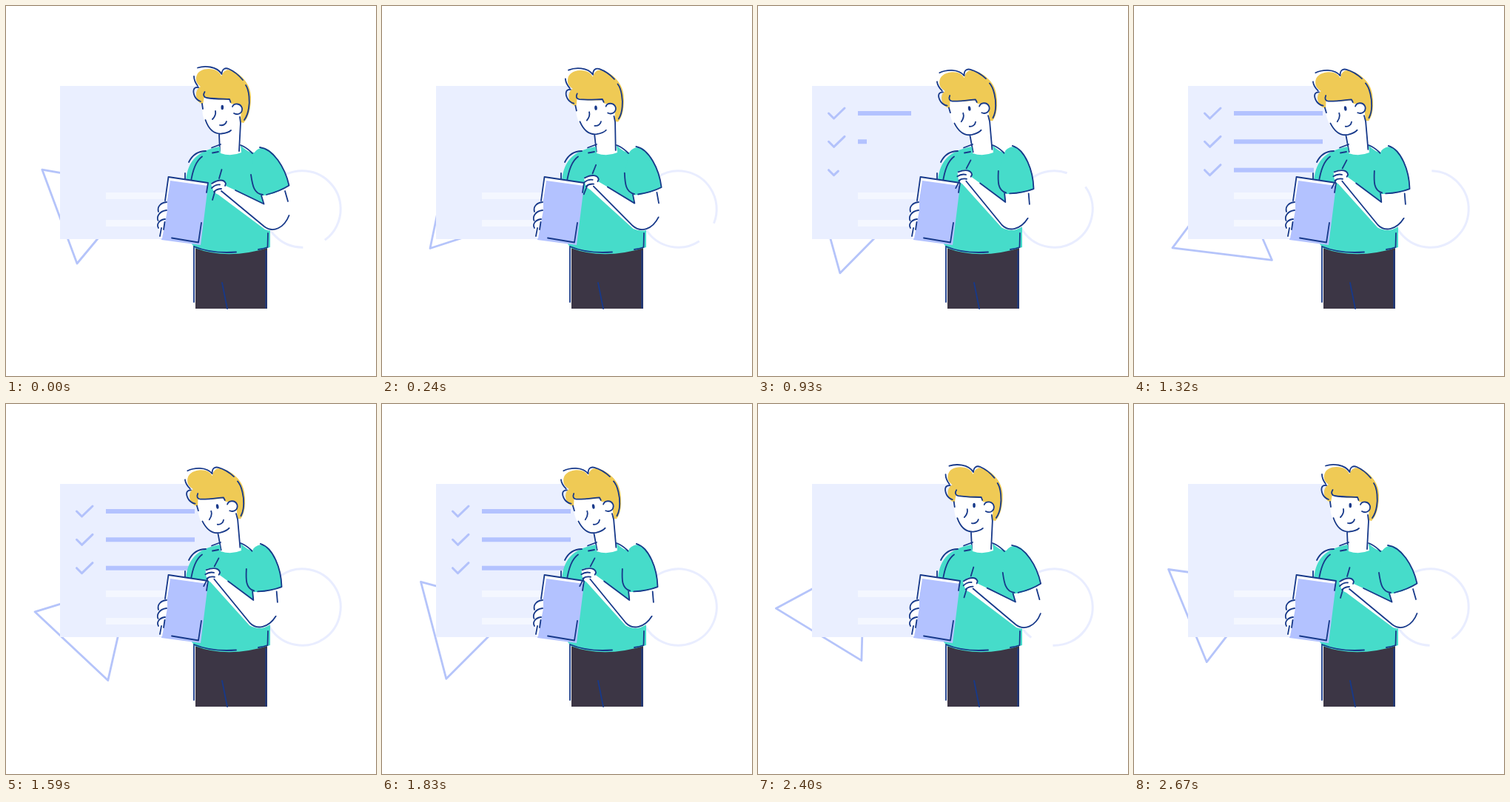
These frames come from a looping animation (500 px wide and 500 px high, 2.7 s). An HTML page:

```html
<!DOCTYPE html>
<html lang="en">
<head>
<meta charset="utf-8">
<title>Checklist</title>
<style>
  html, body { margin: 0; width: 100%; height: 100%; overflow: hidden; background: #fff; }
  svg { display: block; width: 100%; height: 100%; }
  .ink { fill: none; stroke: #17398a; stroke-width: 1.8; stroke-linecap: round; stroke-linejoin: round; }
  .teal { fill: #46dcca; }
  .skin { fill: #fff; }
  .tick { fill: none; stroke: #b3c2fb; stroke-width: 3; stroke-linecap: round; stroke-linejoin: round; }
</style>
</head>
<body>
<svg viewBox="0 0 500 500">
  <circle id="ring" cx="400.5" cy="274.5" r="51.7" fill="none" stroke="#e9edff" stroke-width="3"
    pathLength="360" stroke-dasharray="325 35"/>
  <path id="tri" d="M-67.2-62.9L-20 64L66.2-39.5Z" fill="none" stroke="#b5c4fa" stroke-width="2.8" stroke-linejoin="round"/>

  <path d="M73 108H289V315H73Z" fill="#eaefff"/>
  <path d="M135 252H255V261H135ZM135 289H255V298H135Z" fill="#f4f7ff"/>
  <g id="rows"></g>

  <!-- trousers -->
  <path d="M256 322H353V409H256Z" fill="#3c3645"/>
  <path class="ink" d="M254 325V400M351.5 331V408M292 374L299 409"/>

  <g id="head">
    <path class="skin" d="M287 160L289 199H316L317 150Z"/>
    <path class="skin" d="M265 120L265 135C265 157 274 173 290 173C303 173 313 165 316 152L318 120Z"/>
    <path fill="#efca55" d="M257 97C258 88 266 85 274 85C283 85 289 89 291 95C294 87 299 85 305 87C318 92 331 106 331 123C331 138 328 151 321 158L317 157L318 134L304 132L302 127C288 127 276 126 268 122L266 133C260 131 256 126 257 117C258 113 260 110 263 109C259 106 256 102 257 97Z"/>
    <circle class="skin" cx="312" cy="139.5" r="7"/>
    <path class="ink" d="M259 83.500C268 80.500 285 81 291.500 92C292 85 296 83 301 85C308 88 315 94 320 100M254 95C254 100 256 104 259 108M260 110C253 109 252 115 255 122C257 126 260 128 263 129M268.500 116C266 120 267 123 271 124C283 126 294 125.500 302 126L303.500 130M324 107C329 114 329.500 130 328 138C327 145 325 150 322 154"/>
    <path class="ink" d="M306 136C308 131 317 131 319 138C320 145 313 148 308 145M265 132L266 139M269.500 154C274 167 281 173 291 172.500C296 172 301 171 304 168M283 142C284 147 282 150 279 153M289 161C293 162 297 160 298 156M316 150L317 158L315 196M288 173L289 196"/>
    <ellipse cx="292.300" cy="137" rx="1.800" ry="3.200" fill="#17398a"/>
  </g>

  <!-- shirt -->
  <path class="teal" d="M243 240C244 212 256 196 289 190L290 199Q304 204 318 198L317 188Q327 200 341 198L347 262L357 300V326Q300 344 255 327L250 320Z"/>
  <path class="ink" d="M242 226V236M247 211C252 201 260 196 270 196M249.500 240C252 222 257 209 265 203.500M278 191.500L290 187M279 198.500L287 197M254 325Q278 335 311 332.500M341 329Q348 328 353.500 326L354 307M317 188Q325 191 333 199"/>

  <!-- tablet -->
  <path d="M219 231L273 239L271 250L221 245L214 275Z" fill="#fff"/>
  <path d="M222 236L273 243L263 323L210 316Z" fill="#b3c2ff"/>
  <path class="skin" d="M218 264C210 264 205 269 206 277C203 283 204 291 206 296L208 313L211 314L218 276Z"/>
  <path class="ink" d="M215 263L219.500 231L273 239L271 252M264 293L260 319.500L224 313.500M217 265C209 266 204 271 206 278M217 276C208 277 203 284 205.500 290M215 288C207 289 203 295 206 300M210 300L208 311M214.500 292L213 302"/>

  <g id="arm">
    <path class="skin" d="M277 240C283 235 292 233 297 239L297 243L310 249L349 268L344 250L378 248L383 272V285C378 299 366 307 350 302L287 255L281 252Z"/>
    <path class="teal" d="M335 199C341 190 350 190 357 196C369 206 379 224 382.500 243Q364 255 343 257L331 228Z"/>
    <path class="ink" d="M343 191C361 193 377 218 382.500 242.500Q370 250.500 352 255M331 228C333 242 335 254 347 255"/>
    <path class="ink" d="M377 250L381 264M382.500 283C376 300 361 307 349 298L291 250M310 249L348.500 267.500L345 256"/>
    <path class="ink" d="M278 240C287 234 295 234 297 240L296 243M278 246Q283 241 289 241.500M281 251Q285 247 291 247M291.500 221L288 233M282.500 250L279 262"/>
  </g>
</svg>
<script>
  const LOOP = 2700, STEP = 30, TURN = 2685;
  const $ = id => document.getElementById(id);
  const clamp = v => Math.min(1, Math.max(0, v));
  const ramp = (t, start, len) => clamp((t - start) / len);
  const ease = p => (1 - Math.cos(Math.PI * p)) / 2;

  function make(tag, attrs) {
    const el = document.createElementNS("http://www.w3.org/2000/svg", tag);
    for (const k in attrs) el.setAttribute(k, attrs[k]);
    return $("rows").appendChild(el);
  }

  const rows = [145, 183.3, 221.7].map((y, i) => ({
    start: 450 + 150 * i,
    tick: make("path", { class: "tick", d: `M95.5 ${y}l7 7l14.500-14`, pathLength: 1 }),
    bar: make("rect", { x: 135, y: y - 3, width: 0, height: 6, fill: "#b3c2ff" })
  }));

  function draw(t) {
    const turn = 360 * t / TURN;
    $("tri").setAttribute("transform", `translate(116 284) rotate(${turn})`);
    $("ring").setAttribute("transform", `rotate(${89 - turn} 400.5 274.5)`);

    const lean = ease(ramp(t, 0, 480)) - ease(ramp(t, 1980, 480));
    $("head").setAttribute("transform", `rotate(${-8 * lean} 300 185)`);
    $("arm").setAttribute("transform", `rotate(${11.2 * lean} 354 194)`);

    for (const { start, tick, bar } of rows) {
      const p = ramp(t, start, 300);
      tick.setAttribute("stroke-dasharray", `${p} 2`);
      tick.setAttribute("visibility", p > 0 ? "visible" : "hidden");
      bar.setAttribute("width", 120 * ramp(t, start + 300, 300));
    }
    $("rows").setAttribute("opacity", 1 - ramp(t, 1890, 210));
  }

  const begin = performance.now();
  function tick() {
    const t = Math.max(0, performance.now() - begin) % LOOP;
    draw(Math.floor(t / STEP) * STEP);
    requestAnimationFrame(tick);
  }
  tick();
</script>
</body>
</html>
```
